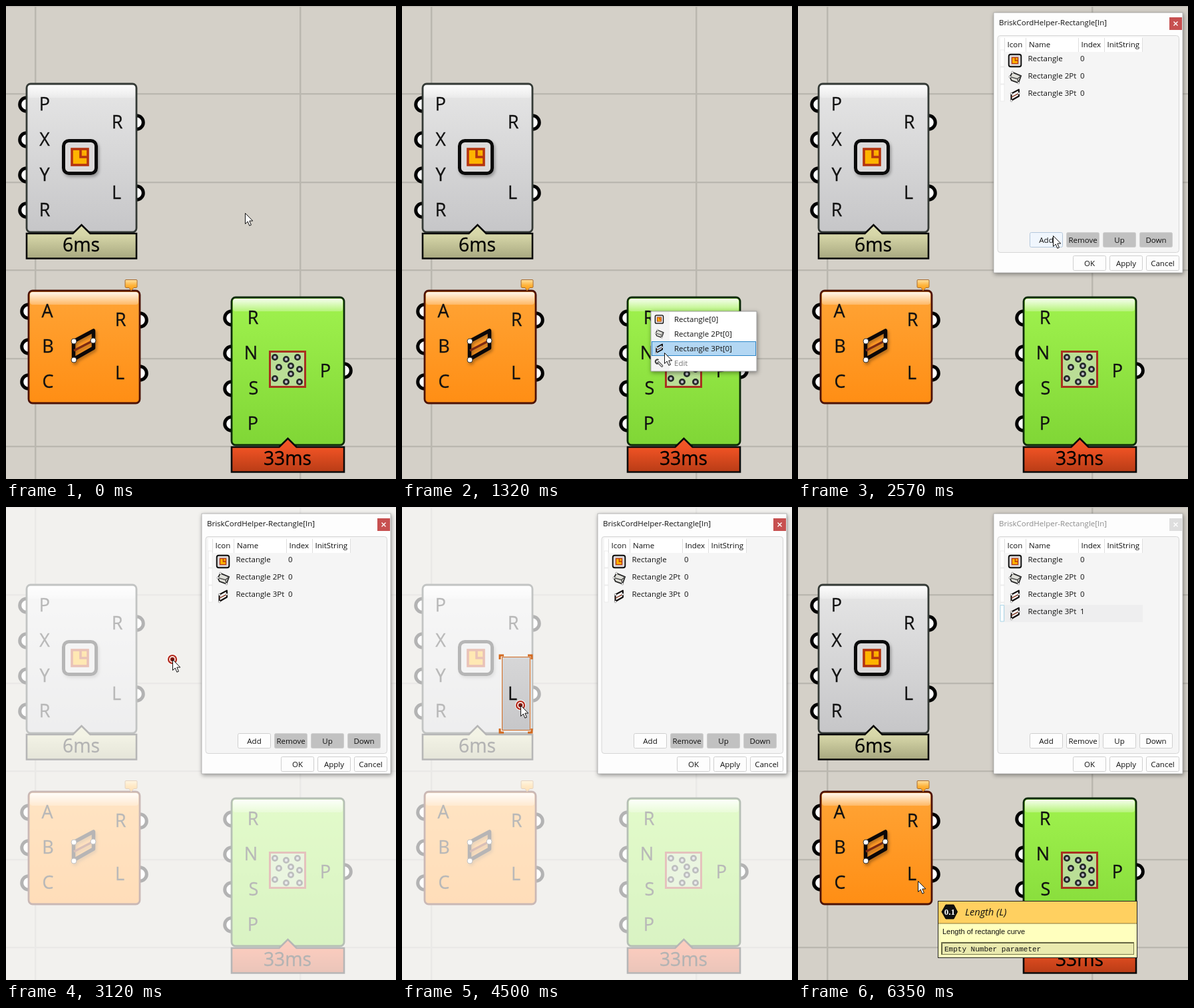
Write an HTML page that moves like this. It is 586 px wide and 711 px high and loops after 7.59 s.

```html
<!DOCTYPE html>
<html lang="en">
<head>
<meta charset="utf-8">
<title>Component wiring</title>
<style>
html, body { margin: 0; width: 100%; height: 100%; overflow: hidden; background: #d4d0c8; }
svg { display: block; position: absolute; left: 0; top: 0; }
text { font-family: "Open Sans", "Noto Sans", sans-serif; font-size: 11.5px; fill: #111; white-space: pre; }
.port { font-size: 27px; stroke: #111; stroke-width: .3px; }
.time { font-size: 28.3px; fill: #000; stroke: #000; stroke-width: .3px; }
.mid { text-anchor: middle; }
.soft { filter: drop-shadow(2px 3px 2px rgba(0,0,0,.3)); }
.window { filter: drop-shadow(1px 2px 3px rgba(0,0,0,.4)); }
</style>
</head>
<body>
<svg id="stage" width="586" height="711" viewBox="0 0 586 711"></svg>
<script>
const LOOP = 7590;
const stage = document.getElementById('stage');

// ---------- markup helpers ----------
const rect = (x, y, x2, y2, fill, attrs = '') =>
  `<rect x="${x}" y="${y}" width="${x2 - x}" height="${y2 - y}" fill="${fill}" ${attrs}/>`;
const path = (d, fill, stroke = 'none', width = 1, attrs = '') =>
  `<path d="${d}" fill="${fill}" stroke="${stroke}" stroke-width="${width}" ${attrs}/>`;
const circle = (x, y, r, fill, stroke = 'none', width = 0) =>
  `<circle cx="${x}" cy="${y}" r="${r}" fill="${fill}" stroke="${stroke}" stroke-width="${width}"/>`;
const text = (x, y, str, cls = '', attrs = '') =>
  `<text x="${x}" y="${y}" class="${cls}" ${attrs}>${str}</text>`;
const group = (id, body, attrs = '') => `<g id="${id}" ${attrs}>${body}</g>`;
const icon = (name, x, y, scale = 1) =>
  `<use href="#${name}" transform="translate(${x} ${y}) scale(${scale})"/>`;
const gradient = (id, ...stops) =>
  `<linearGradient id="${id}" x1="0" y1="0" x2="0" y2="1">` +
  stops.map(([at, color]) => `<stop offset="${at}" stop-color="${color}"/>`).join('') +
  '</linearGradient>';

// ---------- icons, centred on the origin ----------
const dots = points => points.map(([x, y]) => circle(x, y, 4, '#fff', '#333', 1)).join('');
const rings = [[-19, -18], [-2, -15], [15, -18], [-13, -3], [5, -5], [18, 0], [-19, 14], [-2, 19], [5, 7], [18, 19]];
const icons =
  group('iconRect',
    rect(-24.5, -24.5, 24.5, 24.5, '#dcdada', 'rx="8" stroke="#0a0a0a" stroke-width="5"') +
    rect(-12, -12, 12, 12, '#ffb400', 'stroke="#b53410" stroke-width="3.6"') +
    path('M1 -12V0H12', '#ffa800', '#b53410', 3.6)) +
  group('icon2Pt',
    path('M-20 -4L-10 -22L24 -8L14 20L-14 10Z', '#deded8', '#222', 4.5) +
    path('M-20 -4L10 4L14 20M10 4L24 -8', 'none', '#444', 3.5) +
    dots([[-20, -4], [-10, -22], [14, 20]])) +
  group('icon3Pt',
    path('M-14.5 -6L15.5 -22V4L-14.5 21Z', 'none', '#0c0808', 5.5, 'stroke-linejoin="round"') +
    path('M-14 8L15 -7', 'none', '#7c2a12', 3.4) +
    dots([[-14, -6], [15, -7], [-14, 22]])) +
  group('iconPoints',
    rect(-26.5, -26.5, 26.5, 26.5, '#bade96', 'stroke="#a83220" stroke-width="3"') +
    rings.map(([x, y]) => circle(x, y, 3.6, '#b9b9c4', '#252a2a', 2.8)).join('')) +
  group('iconWrench',
    path('M-1 -1L4 4', 'none', '#444', 3.6, 'stroke-linecap="round"') +
    path('M-1 -5A3 3 0 1 0 -1 0', 'none', '#444', 2) +
    path('M-1 -1L4 4', 'none', '#e4e4e4', 1.6, 'stroke-linecap="round"'));

// ---------- canvas components ----------
const grips = (x, ys) => ys.map(y => circle(x, y, 10.3, '#fff', '#000', 5)).join('');
const ports = list => list.map(([x, y, s]) => text(x, y + 9.5, s, 'port mid')).join('');

function component({ box: [x, y, x2, y2], left, right, labels, skin, edge }) {
  return grips(x, left) + grips(x2, right) +
    rect(x, y, x2, y2, `url(#${skin})`, `rx="6" stroke="${edge}" stroke-width="2.8"`) +
    rect(x + 2, y + 2, x2 - 2, y + 21, 'url(#gloss)', 'rx="4"') +
    ports(labels);
}

function timer(x, x2, y, label, skin) {
  const c = (x + x2) / 2;
  return path(`M${x} ${y}H${c - 13}L${c} ${y - 13}L${c + 13} ${y}H${x2}V${y + 37.5}H${x}Z`, `url(#${skin})`, '#0a0a0a', 2.6) +
    text(c - .5, y + 27, label, 'time mid');
}

const gridLines = [44, 442].map(x => rect(x - 1, 0, x + 1.5, 711, '#bab7af')).join('') +
  [0, 132, 265, 397, 530, 662].map(y => rect(0, y - 1, 586, y + 1.3, '#bab7af')).join('');

const scene = rect(0, 0, 586, 711, '#d4d0c8') + gridLines +
  component({
    box: [31, 117, 196, 340], left: [148, 201, 254, 307], right: [175, 281], skin: 'grey', edge: '#343a36',
    labels: [[58, 147, 'P'], [58, 200, 'X'], [58, 253, 'Y'], [58, 306, 'R'], [167, 174, 'R'], [166, 280, 'L']]
  }) +
  timer(31, 196, 342, '6ms', 'khaki') +
  `<g class="soft">${icon('iconRect', 111, 227)}</g>` +
  component({
    box: [34, 428, 201, 597], left: [459, 512, 565], right: [472, 552], skin: 'orange', edge: '#4c1206',
    labels: [[62, 458, 'A'], [63, 511, 'B'], [63, 564, 'C'], [172, 471, 'R'], [171, 551, 'L']]
  }) +
  path('M180 411.5H196Q197 411.5 197 413V422Q197 423.5 195 423.5H192L188 428L185 423.5H181Q179 423.5 179 422V413Q179 411.5 180 411.5Z',
    'url(#balloon)', '#a86a2c', 1) +
  `<g class="soft">${icon('icon3Pt', 116, 510)}</g>` +
  component({
    box: [339, 438, 508, 660], left: [469, 522, 575, 628], right: [548], skin: 'green', edge: '#0b2a08',
    labels: [[371, 468, 'R'], [368, 521, 'N'], [372, 574, 'S'], [371, 627, 'P'], [480, 548, 'P']]
  }) +
  timer(339, 508, 663, '33ms', 'red') +
  icon('iconPoints', 423, 546);

// ---------- context menu ----------
const menuItems = [['Rectangle[0]', 'iconRect', .25], ['Rectangle 2Pt[0]', 'icon2Pt', .27],
  ['Rectangle 3Pt[0]', 'icon3Pt', .3], ['Edit', 'iconWrench', 1]];
const menu = rect(374, 459, 533, 549, '#fff', 'stroke="#a0a0a0" class="window"') +
  rect(375, 460, 402, 548, '#f4f4f4') +
  rect(375.5, 504.5, 531.5, 525.5, '#b3d7f3', 'id="menuHover" stroke="#2b86c8"') +
  menuItems.map(([label, name, scale], i) =>
    icon(name, 386.5, 471 + 22 * i, scale) +
    text(409, 475 + 22 * i, label, '', i === 3 ? 'style="fill:#777"' : '')).join('');

// ---------- editor window ----------
const button = (x, y, label, id = '') =>
  rect(x + .5, y + .5, x + 49.5, y + 22.5, '#fdfdfd', `rx="2" stroke="#cfcfcf" id="${id}"`) +
  text(x + 25, y + 16, label, 'mid');
const row = (y, name, label, index) =>
  rect(304, y - 13, 310, y + 12, '#fff', 'stroke="#e4e4e4" stroke-width=".7"') +
  icon(name, 326, y + 3, .38) + text(345.5, y + 3.5, label) + text(424, y + 3.5, index);
const headers = [[314.5, 'Icon'], [347, 'Name'], [425.5, 'Index'], [464.5, 'InitString']];

const editor = rect(294, 10, 578, 401, '#fdfdfd', 'class="window" stroke="#999" stroke-width=".6"') +
  text(302, 28.5, 'BriskCordHelper-Rectangle[In]', '', 'id="title"') +
  rect(558, 17, 577, 36, '#c75050', 'id="close"') +
  path('M564.5 23.5L570.5 29.5M570.5 23.5L564.5 29.5', 'none', '#fff', 1.4) +
  rect(300, 44.5, 572.5, 370.5, '#f5f5f5', 'rx="4" stroke="#d6d6d6"') +
  rect(304, 47, 517, 69, '#fff') +
  [310, 342, 421, 460, 517].map(x => rect(x, 48, x + 1, 69, '#dedede')).join('') +
  headers.map(([x, s]) => text(x, 62, s)).join('') +
  row(79, 'iconRect', 'Rectangle', 0) +
  row(105, 'icon2Pt', 'Rectangle 2Pt', 0) +
  row(131, 'icon3Pt', 'Rectangle 3Pt', 0) +
  group('newRow', rect(310, 147, 518, 173, '#eeeeef') + row(157, 'icon3Pt', 'Rectangle 3Pt', 1) +
    path('M304 147.5H309.5V172H304Z', '#fff', '#a9d4e6', 1)) +
  button(348, 340, 'Add', 'add') + button(403, 340, 'Remove', 'remove') +
  button(458, 340, 'Up', 'up') + button(513, 340, 'Down', 'down') +
  button(413, 375, 'OK') + button(468, 375, 'Apply') + button(523, 375, 'Cancel');

// ---------- tooltip, pointer ----------
const tooltip = rect(210.5, 592.5, 509.5, 677.5, '#ffffbe', 'stroke="#222"') +
  rect(211, 593, 509, 626, '#ffd060') + rect(211, 625.5, 509, 626.5, '#8a7a40') +
  path('M222 598H234L239.5 608.5L234 619H222L216 608.5Z', '#111', '#000', 1, 'stroke-linejoin="round"') +
  text(227.8, 613, '0.1', 'mid', 'style="font:bold 13px \'Liberation Serif\',serif;fill:#fff"') +
  text(251, 613.5, 'Length (L)', '', 'style="font-size:14.7px;font-style:italic"') +
  text(217, 642, 'Length of rectangle curve', '', 'style="font:11px \'Liberation Sans\',sans-serif"') +
  rect(215.5, 654.5, 504.5, 672.5, '#eaeaae', 'stroke="#77774e"') +
  path('M216.5 672V655.5H504', 'none', '#55553a', 1) +
  text(220, 668, 'Empty Number parameter', '', 'style="font:11px \'Liberation Mono\',monospace"');

const pointer = group('target',
    circle(0, 0, 8, '#fff') + circle(0, 0, 6, '#f6dcd6', '#b3281a', 2.2) + circle(0, 0, 3, '#7c140c')) +
  path('M.5 .5V16.5L4.2 13L6.8 19.2L9.4 18.1L6.8 12H11.8Z', '#fff', '#111', 1);

stage.innerHTML = '<defs>' +
  gradient('grey', [0, '#e6e6e6'], [1, '#c6c6c8']) +
  gradient('orange', [0, '#ffa436'], [1, '#ff8e14']) +
  gradient('green', [0, '#a0f24e'], [1, '#80d636']) +
  gradient('khaki', [0, '#dcdcae'], [.3, '#d6d6a8'], [1, '#a8a880']) +
  gradient('red', [0, '#f25a2a'], [.3, '#ee5224'], [1, '#b83c16']) +
  gradient('balloon', [0, '#ffe0a0'], [.5, '#ffb43c'], [1, '#ff9a10']) +
  '<linearGradient id="gloss" x1="0" y1="0" x2="0" y2="1"><stop offset="0" stop-color="#fff" stop-opacity=".9"/>' +
  '<stop offset="1" stop-color="#fff" stop-opacity=".25"/></linearGradient>' +
  '<clipPath id="pickClip"><rect id="pickArea"/></clipPath>' + icons + '</defs>' +
  group('scene', scene) +
  rect(0, 0, 586, 711, '#fff', 'id="veil"') +
  group('pick', '<use href="#scene" clip-path="url(#pickClip)"/>' +
    path('', 'none', '#d2691e', 1, 'id="pickEdge"') + path('', 'none', '#d2691e', 3, 'id="pickCorners"')) +
  group('menu', menu) + group('editor', editor) + group('tooltip', tooltip) + group('pointer', pointer);

// ---------- motion ----------
const easeIn = p => p ** 1.5;
const easeOut = p => 1 - (1 - p) ** 2;
const easeBoth = p => p * p * (3 - 2 * p);

// first step, last step, step count, destination, easing
const moves = [
  [140, 840, 11, 372, 459, easeBoth],
  [1180, 1320, 3, 394, 521, easeIn],
  [1390, 1600, 4, 411, 538, easeOut],
  [2080, 2570, 8, 383, 345, easeBoth],
  [2990, 3120, 3, 250, 229, easeIn],
  [3190, 3470, 5, 176, 180, easeOut],
  [3820, 4280, 8, 178, 290, easeBoth],
  [4500, 4500, 1, 178, 298, easeOut],
  [4570, 4900, 6, 181, 474, easeBoth],
  [5040, 5520, 8, 180, 562, easeBoth]
];

function pointerAt(t) {
  let x = 359, y = 311;
  for (const [start, end, steps, toX, toY, ease] of moves) {
    if (t < start) break;
    const gap = steps > 1 ? (end - start) / (steps - 1) : 1;
    const step = Math.min(steps, 1 + Math.floor((t - start + 8) / gap));
    const p = ease(step / steps);
    x += (toX - x) * p;
    y += (toY - y) * p;
  }
  return [Math.round(x), Math.round(y)];
}

// time, value: each value holds until the next time
const held = (table, t) => table.reduce((value, [at, next]) => t >= at ? next : value, 0);
const veilSteps = [[2710, .35], [2840, .7], [5870, .45], [5940, .2], [6010, 0]];
const menuSteps = [[910, .6], [980, 1], [1740, 0]];
const editorSteps = [[1740, .3], [1810, .75], [1870, 1]];

const outputs = [[147, 117, 196, 228], [147, 222, 196, 339], [151, 428, 201, 513], [151, 506, 201, 597]];
const inside = (x, y, [x1, y1, x2, y2]) => x >= x1 && x <= x2 && y >= y1 && y <= y2;

const el = id => document.getElementById(id);
const set = (id, attrs) => Object.entries(attrs).forEach(([name, value]) => el(id).setAttribute(name, value));
const show = (id, on) => set(id, { visibility: on ? 'visible' : 'hidden' });

function showPick(area) {
  show('pick', area);
  if (!area) return;
  const [x, y, x2, y2] = area;
  set('pickArea', { x: x + 4, y: y + 4, width: x2 - x - 8, height: y2 - y - 8 });
  set('pickEdge', { d: `M${x + 3.5} ${y + 3.5}H${x2 - 3.5}V${y2 - 3.5}H${x + 3.5}Z` });
  const corner = (cx, cy, dx, dy) => `M${cx + 6 * dx} ${cy}H${cx}V${cy + 6 * dy}`;
  set('pickCorners', {
    d: corner(x, y + 1, 1, 1) + corner(x2 - 1, y + 1, -1, 1) + corner(x, y2, 1, -1) + corner(x2 - 1, y2, -1, -1)
  });
}

function draw(t) {
  const [x, y] = pointerAt(t);
  const picking = t >= 2840 && t < 5870;
  const added = t >= 5870;

  set('pointer', { transform: `translate(${x} ${y})` });
  show('target', picking);
  set('veil', { opacity: held(veilSteps, t) });
  showPick(picking && outputs.find(area => inside(x, y, area)));

  set('menu', { opacity: held(menuSteps, t) });
  const item = Math.min(3, Math.floor((y - 460) / 22));
  show('menuHover', t >= 980 && item >= 0);
  set('menuHover', { y: 460.5 + 22 * Math.max(0, item) });

  set('editor', { opacity: held(editorSteps, t) });
  show('newRow', added);
  set('title', { style: `fill:${added ? '#8c8c8c' : '#111'}` });
  set('close', { fill: added ? '#dedede' : '#c75050' });
  const overAdd = !picking && inside(x, y, [348, 340, 397, 362]);
  set('add', { fill: overAdd ? '#f0f6fd' : '#fdfdfd', stroke: overAdd ? '#b4c8dc' : '#cfcfcf' });
  for (const id of ['remove', 'up', 'down']) set(id, { fill: added ? '#fdfdfd' : '#c1c1c1' });
  show('tooltip', t >= 6350);
}

const start = performance.now();
function tick() {
  draw((performance.now() - start) % LOOP);
  requestAnimationFrame(tick);
}
tick();
</script>
</body>
</html>
```
